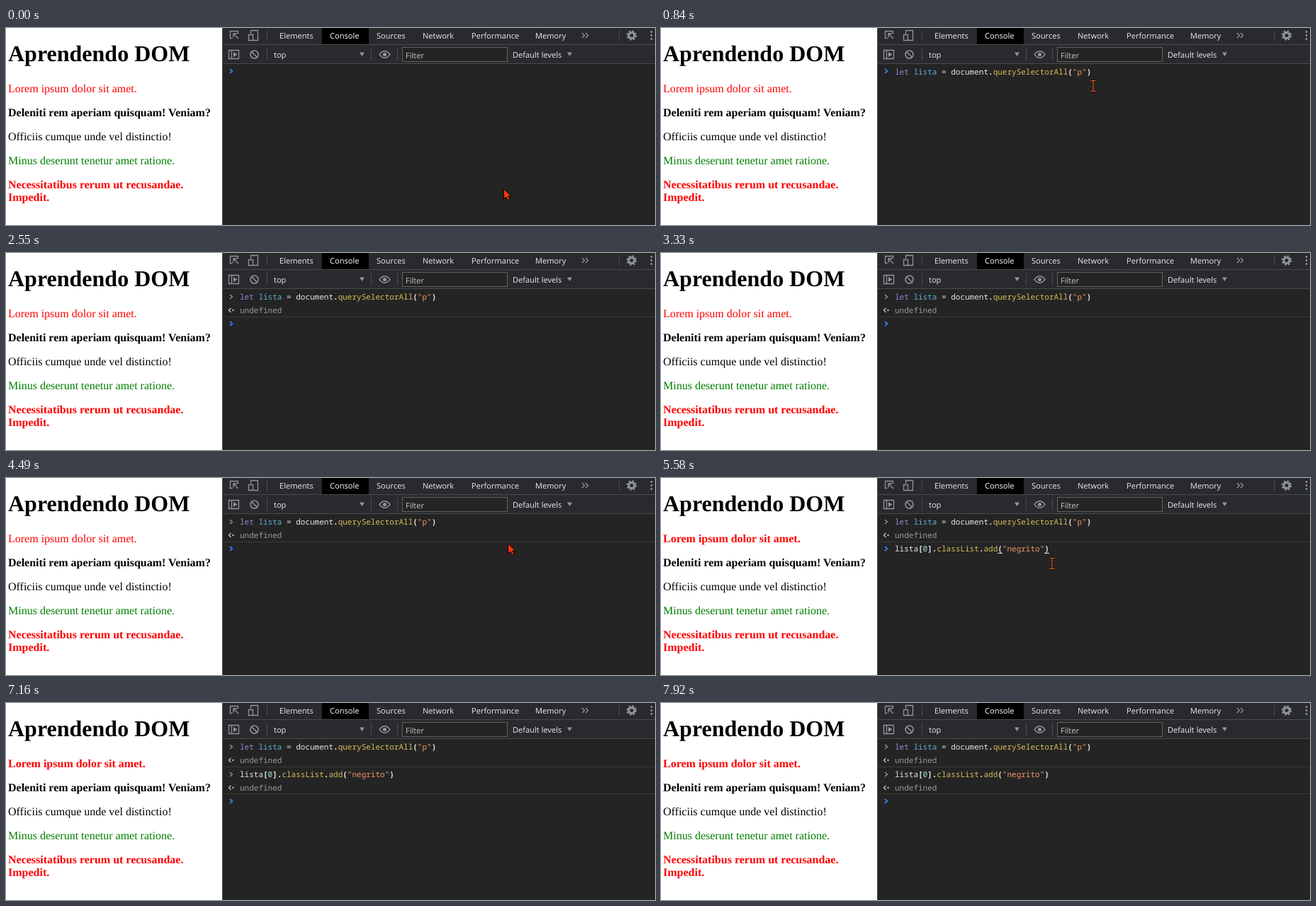
These frames come from a looping animation (916x279 px, 8 s). An HTML page:

```html
<!DOCTYPE html>
<html lang="pt">
<head>
<meta charset="utf-8">
<title>Aprendendo DOM</title>
<style>
  html, body { margin: 0; width: 100%; height: 100%; overflow: hidden; background: #fff; }
  svg { display: block; width: 916px; height: 279px; }
  text { white-space: pre; text-rendering: geometricPrecision; }
  .page { font: 16px "Liberation Serif", serif; }
  .page .title { font-size: 32px; }
  .bold, .page .title { font-weight: bold; }
  .ui { font: 11.1px "Open Sans", sans-serif; fill: #e8eaed; }
  .code { font: 11px "Noto Sans Mono", monospace; fill: #e4e6e8; }
  .keyword { fill: #9a7fd5; }
  .variable { fill: #5db0d7; }
  .call { fill: #d6bd58; }
  .string { fill: #f29766; }
  .number { fill: #9fe3b4; }
  .mark { font-weight: bold; }
  .result { fill: #9a9a9a; }
  .icon { fill: none; stroke: #919498; stroke-width: 1.3; }
  .solid { fill: #919498; }
  .rule { stroke: #494c50; }
  .row { stroke: #3a3a3a; }
  .prompt { fill: none; stroke: #367cf1; stroke-width: 1.7; }
  .past { fill: none; stroke: #9a9a9a; stroke-width: 1.3; }
</style>
</head>
<body>
<svg viewBox="0 0 916 279">
  <defs>
    <path id="chevron" d="M-2 -3L1.5 0L-2 3"/>
    <g id="answer">
      <path d="M-.5 -3L-3.5 0L-.5 3" fill="none" stroke="#c4c6c8" stroke-width="1.3"/>
      <circle cx="2.5" r="1.2" fill="#c4c6c8"/>
    </g>
  </defs>

  <rect width="916" height="279" fill="#fff"/>
  <g class="page">
    <text class="title" x="3" y="47">Aprendendo DOM</text>
    <text id="first" x="3" y="91" fill="#f00">Lorem ipsum dolor sit amet.</text>
    <text class="bold" x="3" y="125">Deleniti rem aperiam quisquam! Veniam?</text>
    <text x="3" y="159">Officiis cumque unde vel distinctio!</text>
    <text x="3" y="193" fill="#008000">Minus deserunt tenetur amet ratione.</text>
    <g class="bold" fill="#f00">
      <text x="3" y="227">Necessitatibus rerum ut recusandae.</text>
      <text x="3" y="245">Impedit.</text>
    </g>
  </g>

  <rect x="305" width="611" height="279" fill="#242424"/>
  <rect x="305" width="611" height="51" fill="#292a2d"/>
  <rect x="446" width="66" height="23" fill="#000"/>
  <path class="rule" d="M305 23.5H916M305 50.5H916M305.5 0V279M368.5 3V18M865.5 3V18M368.5 28V46M515.5 28V46M552.5 28V46"/>
  <rect x="559.5" y="27.5" width="148" height="20" fill="#242424" stroke="#5f6165"/>

  <g class="icon">
    <path d="M319.5 14.5H316.5V4.5H327.5V8M321 8L328 15M321 13.5V8H326.5"/>
    <path d="M345.5 8V3.5H355.5V17.5H349M342.5 9.5H348.5V17.5H342.5Z"/>
    <path d="M314.5 31.5H328.5V43.5H314.5ZM318.5 31.5V43.5"/>
    <circle cx="350.5" cy="37.5" r="5.5" stroke-width="1.6"/>
    <path d="M346.7 33.7L354.3 41.3" stroke-width="1.6"/>
    <path d="M813 7L816.5 10.5L813 14M818 7L821.5 10.5L818 14"/>
    <circle cx="883" cy="10.5" r="4" stroke-width="3"/>
    <circle cx="883" cy="10.5" r="6.2" stroke-width="2" stroke-dasharray="2.6 2.27"/>
    <path d="M527 37.5Q534.5 28 542 37.5Q534.5 47 527 37.5Z"/>
  </g>
  <g class="solid">
    <path d="M321 34L326.5 37.5L321 41Z"/>
    <circle cx="534.5" cy="37.5" r="2.6"/>
    <path d="M499 34.5H506L502.5 40ZM792 34.5H799L795.5 40Z"/>
    <circle cx="911" cy="5.5" r="1.4"/><circle cx="911" cy="10.5" r="1.4"/><circle cx="911" cy="15.5" r="1.4"/>
  </g>
  <g class="ui">
    <text x="386" y="15">Elements</text>
    <text x="457" y="15" fill="#fff">Console</text>
    <text x="523" y="15">Sources</text>
    <text x="588" y="15">Network</text>
    <text x="657" y="15">Performance</text>
    <text x="747" y="15">Memory</text>
    <text x="378" y="42">top</text>
    <text x="564" y="43" fill="#c3c5c8">Filter</text>
    <text x="715" y="42">Default levels</text>
  </g>

  <g class="code">
    <text id="query" x="330" y="66"><tspan class="keyword">let</tspan> <tspan class="variable">lista</tspan> = document<tspan class="mark">.</tspan><tspan class="call">querySelectorAll</tspan><tspan class="mark">(</tspan><tspan class="string">"p"</tspan><tspan class="mark">)</tspan></text>
    <g id="queryDone">
      <use href="#chevron" class="past" x="318" y="62"/>
      <use href="#answer" x="318" y="81"/>
      <text class="result" x="330" y="85">undefined</text>
      <path class="row" d="M306 90.5H916"/>
    </g>
    <text id="add" x="330" y="104">lista<tspan class="mark">[</tspan><tspan class="number">0</tspan><tspan class="mark">].</tspan><tspan class="call">classList</tspan><tspan class="mark">.</tspan><tspan class="call">add</tspan><tspan class="mark">(</tspan><tspan class="string">"negrito"</tspan><tspan class="mark">)</tspan></text>
    <path id="brackets" d="M475 106.5H482M541 106.5H548" stroke="#e4e6e8"/>
    <g id="addDone">
      <use href="#chevron" class="past" x="318" y="101"/>
      <use href="#answer" x="318" y="120"/>
      <text class="result" x="330" y="124">undefined</text>
      <path class="row" d="M306 128.5H916"/>
    </g>
  </g>
  <use id="prompt" href="#chevron" class="prompt" x="318"/>

  <g id="pointer">
    <path id="arrow" d="M.5 0V14L3.8 11L6.5 16L9 14.8L6.8 10H11Z" fill="#f5390f" stroke="#100" stroke-width="1"/>
    <g id="beam" fill="none">
      <path d="M-4 -7.5H4M-4 7.5H4M0 -7V7" stroke="#110a08" stroke-width="3"/>
      <path d="M-4 -7.5H-1L0 -6.5L1 -7.5H4M-4 7.5H-1L0 6.5L1 7.5H4M0 -6.5V6.5" stroke="#e8622c" stroke-width="1.2"/>
    </g>
  </g>
</svg>
<script>
const LOOP = 8000;
const QUERY_PASTE = 840, QUERY_ENTER = 1370;
const ADD_PASTE = 5120, ADD_BOLD = 5570, ADD_ENTER = 5655;

// Each visit: time, x, y
const visits = [
  { points: [[0, 702, 228], [150, 702, 228], [700, 610, 82]], end: QUERY_ENTER, beamFrom: 620 },
  { points: [[3800, 702, 150], [4250, 708, 93], [4560, 708, 93], [5350, 552, 121]], end: ADD_ENTER, beamFrom: 5000 }
];

const el = id => document.getElementById(id);
const show = (id, on) => el(id).setAttribute("visibility", on ? "visible" : "hidden");
const ease = p => p * p * (3 - 2 * p);

function position(points, t) {
  const next = points.findIndex(p => p[0] > t);
  if (next < 0) return points[points.length - 1].slice(1);
  const [t0, x0, y0] = points[next - 1], [t1, x1, y1] = points[next];
  const p = ease((t - t0) / (t1 - t0));
  return [Math.round(x0 + (x1 - x0) * p), Math.round(y0 + (y1 - y0) * p)];
}

function drawPointer(t) {
  const visit = visits.find(v => t >= v.points[0][0] && t < v.end);
  const beam = visit && t >= visit.beamFrom;
  show("arrow", visit && !beam);
  show("beam", beam);
  if (visit) el("pointer").setAttribute("transform", `translate(${position(visit.points, t)})`);
}

function draw(now) {
  const t = now % LOOP;
  const queried = t >= QUERY_ENTER, added = t >= ADD_ENTER;
  show("query", t >= QUERY_PASTE);
  show("queryDone", queried);
  show("add", t >= ADD_PASTE);
  show("brackets", t >= ADD_PASTE && !added);
  show("addDone", added);
  el("add").setAttribute("y", added ? 105 : 104);
  el("first").setAttribute("class", t >= ADD_BOLD ? "bold" : "");
  el("prompt").setAttribute("y", added ? 139 : queried ? 100 : 61);
  drawPointer(t);
}

const start = performance.now();
function tick() {
  draw(performance.now() - start);
  requestAnimationFrame(tick);
}
tick();
</script>
</body>
</html>
```
